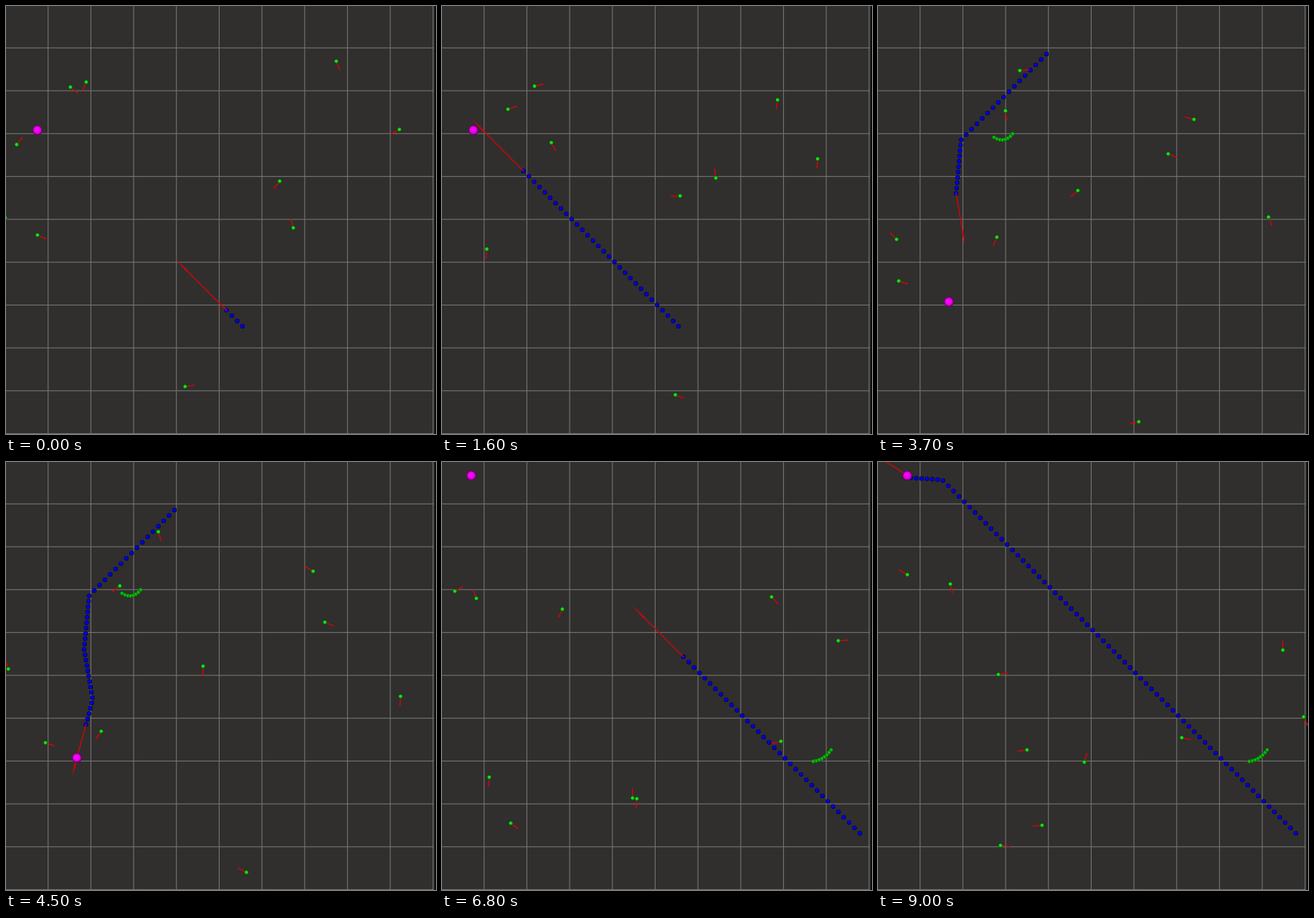
Animation, 600 px wide and 596 px high, one loop 9.1 s. Source, as an HTML page with a canvas:

```html
<!DOCTYPE html>
<html lang="en">
<head>
<meta charset="utf-8">
<title>Path planning among moving obstacles</title>
<style>
  html, body { margin: 0; width: 100%; height: 100%; overflow: hidden; background: #302f2d; }
  canvas { display: block; }
</style>
</head>
<body>
<canvas id="stage" width="600" height="596"></canvas>
<script>
const ctx = document.getElementById('stage').getContext('2d');
const LOOP = 9100, TICK = 100, CELL = 7.46, LOOK_AHEAD = 9.7;
const GOLDEN = Math.PI * (3 - Math.sqrt(5));

// The robot adds one dot per grid cell; an avoided obstacle leaves a curved trace.
const runs = [
  { start: -200, pace: 61, goal: [44, 173],
    route: [[330, 446], [57, 173], [44, 173]] },
  { start: 2180, pace: 57.5, goal: [99, 412],
    route: [[235, 67], [116, 186], [109, 261], [121, 331], [99, 412]],
    seen: 2700, trace: [[162, 183], [177, 192], [188, 178]] },
  { start: 4850, pace: 57.5, goal: [41, 19],
    route: [[583, 517], [90, 25], [45, 22], [19, 3]],
    seen: 5500, trace: [[543, 401], [533, 415], [518, 417]] }
];

// Obstacles wander through a few places, swaying to a side in between.
const keyTimes = [0, 3700, 6800, 9000], SWAY = 28;
const walkers = [
  [[90, 113], [166, 322], [96, 503], [229, 506]],
  [[112, 106], [198, 90], [168, 205], [168, 296]],
  [[15, 193], [178, 146], [48, 190], [101, 170]],
  [[461, 77], [441, 158], [460, 188], [565, 262]],
  [[549, 172], [545, 294], [473, 389], [424, 384]],
  [[250, 530], [364, 579], [266, 468], [208, 401]],
  [[382, 244], [279, 257], [272, 469], [288, 418]],
  [[401, 309], [405, 206], [553, 249], [594, 355]],
  [[44, 319], [26, 325], [18, 180], [41, 157]],
  [[-1, 295], [29, 383], [66, 439], [171, 534]]
];

function ball(x, y, r, light, mid, dark) {
  const g = ctx.createRadialGradient(x - r * .2, y - r * .2, 0, x, y, r);
  g.addColorStop(0, light);
  g.addColorStop(.65, mid);
  g.addColorStop(1, dark);
  ctx.fillStyle = g;
  ctx.beginPath();
  ctx.arc(x, y, r, 0, 7);
  ctx.fill();
}

function arrow(x, y, dx, dy) {
  const length = Math.hypot(dx, dy);
  ctx.save();
  ctx.translate(x, y);
  ctx.rotate(Math.atan2(dy, dx));
  ctx.fillStyle = '#cc060c';
  ctx.fillRect(0, -.75, length * .78, 1.5);
  ctx.beginPath();
  ctx.moveTo(length * .76, -1.4);
  ctx.lineTo(length, 0);
  ctx.lineTo(length * .76, 1.4);
  ctx.fill();
  ctx.restore();
}

function drawGrid() {
  ctx.fillStyle = '#302f2d';
  ctx.fillRect(0, 0, 600, 596);
  ctx.fillStyle = '#757573';
  for (let i = 0; i < 10; i++) {
    const p = 58 + i * 59.68;
    ctx.fillRect(p + .2, 0, 1.1, 596);
    ctx.fillRect(0, p - .2, 597, 1.1);
  }
  ctx.fillStyle = '#0b0b0b';
  ctx.fillRect(598, 0, 2, 596);
}

// A diagonal step counts as one cell, so distance is the larger axis difference.
function along(route, d) {
  for (let i = 1; ; i++) {
    const [x0, y0] = route[i - 1], [x1, y1] = route[i];
    const len = Math.max(Math.abs(x1 - x0), Math.abs(y1 - y0));
    if (d < len || i === route.length - 1) {
      return [x0 + (x1 - x0) * d / len, y0 + (y1 - y0) * d / len];
    }
    d -= len;
  }
}

function drawRun({ route, start, pace, seen, trace }, t) {
  const n = Math.floor((t - start) / pace);
  const [x, y] = along(route, n * CELL), [nx, ny] = along(route, (n + 1) * CELL);
  for (let i = 0; i <= n; i++) {
    ball(...along(route, i * CELL), 3.2, '#0000f0', '#0000d0', '#000038');
  }
  arrow(x, y, (nx - x) * LOOK_AHEAD, (ny - y) * LOOK_AHEAD);
  if (!trace) return;
  const [a, b, c] = trace, shown = Math.min(8, (t - seen) / TICK + 1);
  for (let i = 0; i < shown; i++) {
    const u = i / 7, v = 1 - u;
    const at = k => v * v * a[k] + 2 * u * v * b[k] + u * u * c[k];
    ball(at(0), at(1), 2.9, '#10c010', '#0ca80c', '#084c08');
  }
}

// Smooth curve through the places; the sway vanishes at each of them.
function walkerAt(places, i, t) {
  let k = 0;
  while (k < keyTimes.length - 2 && t >= keyTimes[k + 1]) k++;
  const u = (t - keyTimes[k]) / (keyTimes[k + 1] - keyTimes[k]);
  const b = places[k], c = places[k + 1], a = places[k - 1] || b, d = places[k + 2] || c;
  const sway = SWAY * Math.sin(Math.PI * (k + u));
  return [Math.cos(i * GOLDEN), Math.sin(i * GOLDEN)].map((side, j) =>
    b[j] + u / 2 * (c[j] - a[j] + u * (2 * a[j] - 5 * b[j] + 4 * c[j] - d[j]
      + u * (3 * (b[j] - c[j]) + d[j] - a[j]))) + side * sway);
}

function drawWalker(places, i, t) {
  const [x, y] = walkerAt(places, i, t), [nx, ny] = walkerAt(places, i, t + 1);
  const scale = 14 / (Math.hypot(nx - x, ny - y) || 1);
  arrow(x, y, (nx - x) * scale, (ny - y) * scale);
  ball(x, y, 3, '#22e822', '#12cc12', '#064006');
}

function draw(now) {
  const t = Math.floor(now % LOOP / TICK) * TICK;
  const run = runs.filter(r => t >= r.start).pop();
  drawGrid();
  drawRun(run, t);
  walkers.forEach((places, i) => drawWalker(places, i, t));
  ball(...run.goal, 6.9, '#ff08ff', '#e800e8', '#500050');
}

const begin = performance.now();
function frame() {
  draw(performance.now() - begin);
  requestAnimationFrame(frame);
}
frame();
</script>
</body>
</html>
```
